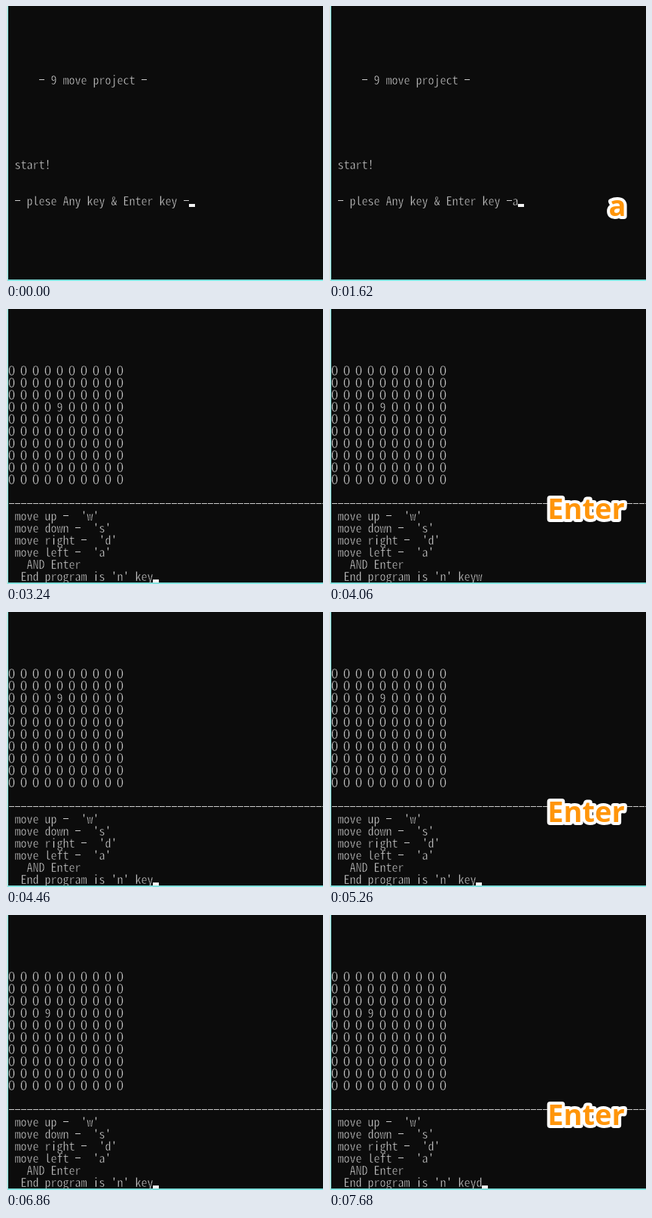
These frames come from a looping animation (421 px wide and 364 px high, 8 s). An HTML page with a canvas:

```html
<!DOCTYPE html>
<html lang="en">
<head>
<meta charset="utf-8">
<title>9 move project</title>
<style>
  html, body { margin: 0; width: 100%; height: 100%; overflow: hidden; background: #0c0c0c; }
  canvas { display: block; }
</style>
</head>
<body>
<canvas id="stage" width="421" height="364"></canvas>
<script>
const ctx = document.getElementById('stage').getContext('2d');
const LOOP = 8000, CELL_W = 8, CELL_H = 16, LEFT = 3, TOP = 10;
const BACK = '#0c0c0c', INK = '#ccc';

const MONO = '"Noto Sans Mono CJK JP", "Noto Sans Mono CJK KR", "Noto Sans Mono", monospace';
const ZERO_FONT = '300 17px "Noto Sans CJK JP", "Noto Sans CJK KR", "Noto Sans", sans-serif';
const BADGE_FONT = 'bold 38px "Open Sans", "Noto Sans", sans-serif';

// Pick the size whose advance fills one cell.
ctx.font = `300 16px ${MONO}`;
const TEXT_FONT = `300 ${16 * CELL_W / ctx.measureText('n').width}px ${MONO}`;

// [start ms, position of the 9 (null = title), typed key, cursor on, badge]
const steps = [
  [0, null, '', true, ''],
  [400, null, '', false, ''],
  [800, null, '', true, ''],
  [1220, null, '', false, ''],
  [1620, null, 'a', true, 'a'],
  [2020, null, 'a', true, 'Enter'],
  [2440, [4, 3], '', true, ''],
  [3640, [4, 3], 'w', true, 'w'],
  [4060, [4, 3], 'w', false, 'Enter'],
  [4460, [4, 2], '', true, ''],
  [4860, [4, 2], '', false, 'a'],
  [5260, [4, 2], '', true, 'Enter'],
  [5660, [3, 2], '', true, ''],
  [6060, [3, 2], 's', true, 's'],
  [6460, [3, 2], 's', false, 'Enter'],
  [6860, [3, 3], '', true, ''],
  [7280, [3, 3], 'd', true, 'd'],
  [7680, [3, 3], 'd', true, 'Enter']
];

const help = [
  [1, "move up -  'w'"],
  [1, "move down -  's'"],
  [1, "move right -  'd'"],
  [1, "move left -  'a'"],
  [3, 'AND Enter']
];

function rect(color, x, y, w, h) {
  ctx.fillStyle = color;
  ctx.fillRect(x, y, w, h);
}

function print(col, row, text) {
  ctx.textAlign = 'center';
  ctx.lineWidth = 0.4;
  ctx.strokeStyle = BACK;
  [...text].forEach((ch, i) => {
    const x = LEFT + (col + i) * CELL_W, y = TOP + row * CELL_H;
    if (ch === '-') return rect(INK, x + 1, y + 7, 7, 1);
    ctx.fillStyle = INK;
    ctx.font = ch === '0' ? ZERO_FONT : TEXT_FONT;
    ctx.fillText(ch, x + 4.5, y + 14);
    ctx.strokeText(ch, x + 4.5, y + 14); // thins the strokes
  });
}

function prompt(col, row, text, key, cursor) {
  const line = text + key;
  print(col, row, line);
  if (cursor) {
    rect('#f2f2f2', LEFT + (col + line.length) * CELL_W, TOP + row * CELL_H + 12, CELL_W, 4);
  }
}

function titleScreen(key, cursor) {
  print(5, 5, '- 9 move project -');
  print(1, 12, 'start!');
  prompt(1, 15, '- plese Any key & Enter key -', key, cursor);
}

function gameScreen([px, py], key, cursor) {
  for (let y = 0; y < 10; y++) {
    for (let x = 0; x < 10; x++) {
      print(x * 2, y + 4, x === px && y === py ? '9' : '0');
    }
  }
  print(0, 15, '-'.repeat(53));
  help.forEach(([col, text], i) => print(col, 16 + i, text));
  prompt(2, 21, "End program is 'n' key", key, cursor);
}

function drawBadge(text) {
  ctx.font = BADGE_FONT;
  ctx.textAlign = 'left';
  ctx.lineJoin = 'round';
  ctx.lineWidth = 8;
  ctx.strokeStyle = '#fff';
  ctx.fillStyle = '#ff950a';
  const x = 392.5 - ctx.measureText(text).actualBoundingBoxRight, y = 278;
  ctx.strokeText(text, x, y);
  ctx.fillText(text, x, y);
}

function draw(now) {
  const t = now % LOOP;
  const [, nine, key, cursor, badge] = steps.findLast(s => s[0] <= t);
  rect(BACK, 0, 0, 421, 364);
  if (nine) gameScreen(nine, key, cursor);
  else titleScreen(key, cursor);
  rect('#d9e6e6', 0, 0, 2, 364);
  rect('#7fe0dc', 2, 0, 1, 364);
  rect('#7fe0dc', 2, 362, 419, 2);
  if (badge) drawBadge(badge);
}

const start = performance.now();
function tick() {
  draw(performance.now() - start);
  requestAnimationFrame(tick);
}
tick();
</script>
</body>
</html>
```
